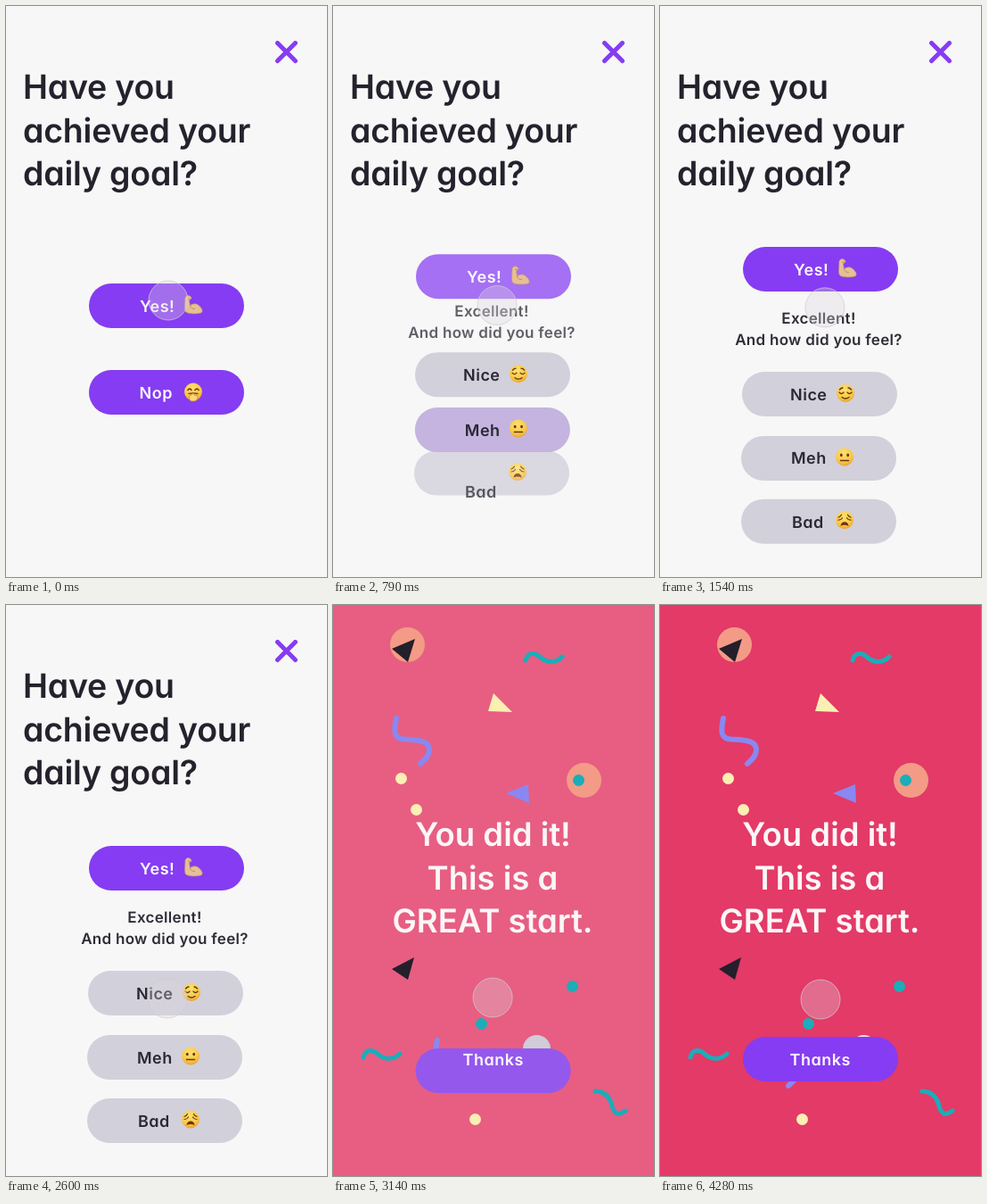
An HTML page for the animation above (4310 ms loop, 360 by 640 pixels).

```html
<!DOCTYPE html>
<html lang="en">
<head>
<meta charset="utf-8">
<title>Daily goal</title>
<style>
  html, body { margin: 0; width: 100%; height: 100%; overflow: hidden; background: #f7f7f7; }
  svg { display: block; width: 100vw; height: 100vh; }
  text {
    font-family: Inter, Lato, sans-serif;
    font-weight: 600;
    font-feature-settings: "cv11";
    text-rendering: geometricPrecision;
  }
  .title { font-size: 37.5px; letter-spacing: -.2px; fill: #25222d; }
  .win { font-size: 36.5px; fill: #fcf6f7; text-anchor: middle; }
  .label { font-size: 18px; letter-spacing: .5px; fill: #fbf8ff; }
  .dark { fill: #2b2833; }
  .ask { font-size: 17px; letter-spacing: .3px; fill: #2f2c37; text-anchor: middle; }
  .line { fill: none; stroke-linecap: round; stroke-linejoin: round; }
</style>
</head>
<body>
<svg viewBox="0 0 360 640">
  <defs>
    <radialGradient id="skin" cx=".45" cy=".3" r=".75">
      <stop offset="0" stop-color="#ffe071"/>
      <stop offset=".65" stop-color="#f9c846"/>
      <stop offset="1" stop-color="#e99a2c"/>
    </radialGradient>
    <g id="arm">
      <path fill="#e6c094" stroke="#c99a68" stroke-width=".7" d="M-8 -10C-6 -11 -3 -10 -2.500 -7.500C-3 -6 -5 -6 -5 -4.500L-4 1C-1 -2 4 -2 7 2C10 5 10.500 8 8 9C3 10 -3 10.500 -8 8.500C-11 7 -9.500 0 -9.500 -8Z"/>
      <path class="line" stroke="#c08d5c" d="M-6 -7L-3.500 -6.500M-4 1Q-3 5 1 4.500"/>
    </g>
    <circle id="head" r="10" fill="url(#skin)"/>
    <g id="giggle">
      <use href="#head"/>
      <path class="line" stroke="#61370f" stroke-width="1.500" d="M-6 -2Q-4 -5 -2 -2M2 -2Q4 -5 6 -2"/>
      <path class="line" stroke="#8f3d22" stroke-width="1.500" d="M-5 2Q0 1 5 2"/>
      <path fill="#fbd978" stroke="#c98526" stroke-width=".8" d="M-4 9Q-6 4 -2.500 4L-1 2Q1 1 1.500 4Q5 3 5 6Q5 10 1 10.500Q-3 11 -4 9Z"/>
    </g>
    <g id="calm">
      <use href="#head"/>
      <path class="line" stroke="#61370f" stroke-width="1.300" d="M-7 -1Q-4.500 2 -2 -1M2 -1Q4.500 2 7 -1M-4 4.500Q0 7.500 4 4.500M-6.500 -4Q-5 -6 -3 -6M6.500 -4Q5 -6 3 -6"/>
    </g>
    <g id="flat">
      <use href="#head"/>
      <ellipse cx="-3.700" cy="-2" rx="1.400" ry="1.800" fill="#61370f"/>
      <ellipse cx="3.700" cy="-2" rx="1.400" ry="1.800" fill="#61370f"/>
      <path class="line" stroke="#61370f" stroke-width="1.500" d="M-4.500 4H4.500"/>
    </g>
    <g id="weary">
      <use href="#head"/>
      <path class="line" stroke="#61370f" stroke-width="1.200" d="M-7 0Q-4 0 -2.500 -2.500M7 0Q4 0 2.500 -2.500M-7 -3Q-4.500 -4 -3.500 -6M7 -3Q4.500 -4 3.500 -6"/>
      <path fill="#713312" d="M-4.500 6.500Q-4 2 0 2Q4 2 4.500 6.500Q0 4.500 -4.500 6.500Z"/>
    </g>
    <path id="wave" class="line" stroke="#1badb9" stroke-width="5" d="M216 62C219 52 227 53 233 59C240 65 250 65 257 58"/>
    <path id="curl" class="line" stroke="#8988f2" stroke-width="6" d="M71 127C67 145 70 150 80 150.500C98 151 108 153 108 162C108 170 102 174 98 178"/>
  </defs>

  <rect id="bg" width="360" height="640"/>

  <g id="party">
    <g fill="#f39b86"><circle cx="83.500" cy="44.500" r="19.500"/><circle cx="281.500" cy="196.500" r="19.500"/></g>
    <path fill="#231f2b" d="M66 49L92 38L84 64ZM66 408L91 395L84 420Z"/>
    <path fill="#fbefb4" d="M180 99L201 120L174 119Z"/>
    <path fill="#8988f2" d="M194 211L219 201L220 222Z"/>
    <use href="#wave"/>
    <use href="#wave" x="-182" y="445"/>
    <path class="line" stroke="#1badb9" stroke-width="5" d="M294 545C304 545 309 550 312 558C315 571 319 573 328 567"/>
    <use href="#curl"/>
    <use href="#curl" x="46" y="361"/>
    <g fill="#fbefb4"><circle cx="76.500" cy="194.500" r="6.500"/><circle cx="93.500" cy="229.500" r="6.500"/><circle cx="159.500" cy="576.500" r="6.500"/></g>
    <g fill="#1badb9"><circle cx="275.500" cy="196.500" r="6.500"/><circle cx="268.500" cy="427.500" r="6.500"/><circle cx="166.500" cy="469.500" r="6.500"/></g>
    <circle id="moon" cx="228.500" cy="497.500" r="15.500"/>
  </g>
  <rect id="thanks" width="174" height="50" rx="25"/>
  <g id="cheer">
    <text class="win" x="179.500" y="270">You did it!</text>
    <text class="win" x="179" y="318.500">This is a</text>
    <text class="win" x="179" y="367">GREAT start.</text>
    <text class="label" x="145.500" y="516">Thanks</text>
  </g>

  <g id="quiz">
    <path class="line" stroke="#863cf2" stroke-width="5" d="M304.500 41.500L324.500 61.500M324.500 41.500L304.500 61.500"/>
    <text class="title" x="19" y="104">Have you</text>
    <text class="title" x="19" y="152.500">achieved your</text>
    <text class="title" x="19" y="201">daily goal?</text>
    <g id="bad">
      <rect x="91" width="174" height="50" rx="25" fill="#d2d0da"/>
      <use href="#weary" x="207" y="23.500"/>
    </g>
    <text id="badText" class="label dark" x="148" y="31.500">Bad</text>
    <g id="meh">
      <rect x="91" width="174" height="50" rx="25" fill="#d2d0da"/>
      <rect id="nopFill" x="91" width="174" height="50" rx="25" fill="#863cf2"/>
      <g id="nopIn"><text class="label" x="147.500" y="31.500">Nop</text><use href="#giggle" x="208" y="24.500"/></g>
      <g id="mehIn"><text class="label dark" x="147" y="31.500">Meh</text><use href="#flat" x="207" y="23.500"/></g>
    </g>
    <g id="nice">
      <rect x="92" width="174" height="50" rx="25" fill="#d2d0da"/>
      <text class="label dark" x="146" y="31.500">Nice</text>
      <use href="#calm" x="208" y="24"/>
    </g>
    <g id="ask">
      <text class="ask" x="178" y="356">Excellent!</text>
      <text class="ask" x="178" y="380">And how did you feel?</text>
    </g>
    <g id="yes">
      <rect id="yesFill" x="93" width="174" height="50" rx="25" fill="#863cf2"/>
      <text class="label" x="150" y="31.500">Yes!</text>
      <use href="#arm" x="210.500" y="24"/>
    </g>
  </g>

  <circle id="touch" r="22" fill="rgba(220,214,220,.32)" stroke="rgba(208,203,208,.75)"/>
</svg>
<script>
const LOOP = 4310;
const el = {};
document.querySelectorAll('svg [id]').forEach(n => el[n.id] = n);

const clamp = x => Math.min(1, Math.max(0, x));
const mix = (a, b, p) => a + (b - a) * p;
const smooth = x => x * x * (3 - 2 * x);
const easeOut = x => 1 - (1 - x) ** 3;
const span = (t, from, length) => clamp((t - from) / length);

// Underdamped spring from 0 to 1
function spring(ms) {
  if (ms <= 0) return 0;
  const s = ms / 1000, damp = 4.86, freq = 5.76;
  return 1 - Math.exp(-damp * s) * (Math.cos(freq * s) + damp / freq * Math.sin(freq * s));
}

// Rows are [time, value, ...]
function track(rows, t, ease = x => x) {
  let i = 0;
  while (i < rows.length - 2 && t >= rows[i + 1][0]) i++;
  const a = rows[i], b = rows[i + 1];
  const p = ease(span(t, a[0], b[0] - a[0]));
  return a.slice(1).map((v, k) => mix(v, b[k + 1], p));
}

const colour = (a, b, p) => `rgb(${a.map((v, i) => Math.round(mix(v, b[i], p)))})`;
const move = (node, x, y) => node.setAttribute('transform', `translate(${x} ${y})`);
const fade = (node, a) => node.setAttribute('opacity', a);
const fill = (node, c) => node.setAttribute('fill', c);

const GREY = [210, 208, 218], PURPLE = [134, 60, 242];
const PAPER = [247, 247, 247], PINK = [227, 58, 103];

const fingers = [
  [0, 182, 330], [300, 182, 331], [550, 183, 333], [790, 184, 335.5],
  [1120, 184.5, 336.5], [1640, 185, 338], [2330, 184.5, 447],
  [2600, 181, 441], [2690, 179.5, 440], [3300, 179, 440],
  [3930, 179.5, 440], [4200, 179.5, 440.5], [4280, 180, 442]
];
const yesAlpha = [[545, 1], [800, .71], [1100, 1]];
const nopAlpha = [[545, 1], [790, .19], [900, 0]];
const badAlpha = [[560, 0], [790, .8], [900, 1]];
const textAlpha = [[550, 0], [790, .75], [960, 1]];

function draw(t) {
  const rise = easeOut(span(t, 545, 590));
  const mehP = spring(t - 587), badP = spring(t - 570);

  move(el.yes, 0, mix(311, 270, rise));
  fade(el.yesFill, track(yesAlpha, t)[0]);
  move(el.nice, 0, mix(300, 410, rise));
  fade(el.nice, span(t, 550, 170));
  move(el.ask, 0, mix(-40, 0, rise));
  fade(el.ask, track(textAlpha, t)[0]);

  move(el.meh, mix(2, 0, clamp(mehP)), mix(408, 482, mehP));
  fade(el.nopFill, track(nopAlpha, t)[0]);
  fade(el.nopIn, 1 - span(t, 545, 170));
  fade(el.mehIn, span(t, 580, 200));
  move(el.bad, 0, mix(408, 553, badP));
  fade(el.bad, track(badAlpha, t)[0]);
  move(el.badText, 0, mix(382, 553, rise));
  fade(el.badText, track(textAlpha, t)[0]);

  const win = smooth(span(t, 2798, 475));
  const shown = smooth(span(t, 2800, 160));
  fill(el.bg, colour(PAPER, PINK, win));
  fade(el.quiz, 1 - smooth(span(t, 2795, 160)));
  fade(el.party, shown);
  fade(el.cheer, shown);
  fill(el.moon, colour([208, 204, 216], [236, 226, 234], span(t, 3250, 150)));
  fade(el.thanks, t < 2795 ? 0 : 1);
  move(el.thanks, mix(91, 93, win), mix(553, 484, win));
  fill(el.thanks, colour(GREY, PURPLE, win));

  const [x, y] = track(fingers, t, smooth);
  move(el.touch, x, y);
}

const start = performance.now();
function tick() {
  draw((performance.now() - start) % LOOP);
  requestAnimationFrame(tick);
}
tick();
</script>
</body>
</html>
```
